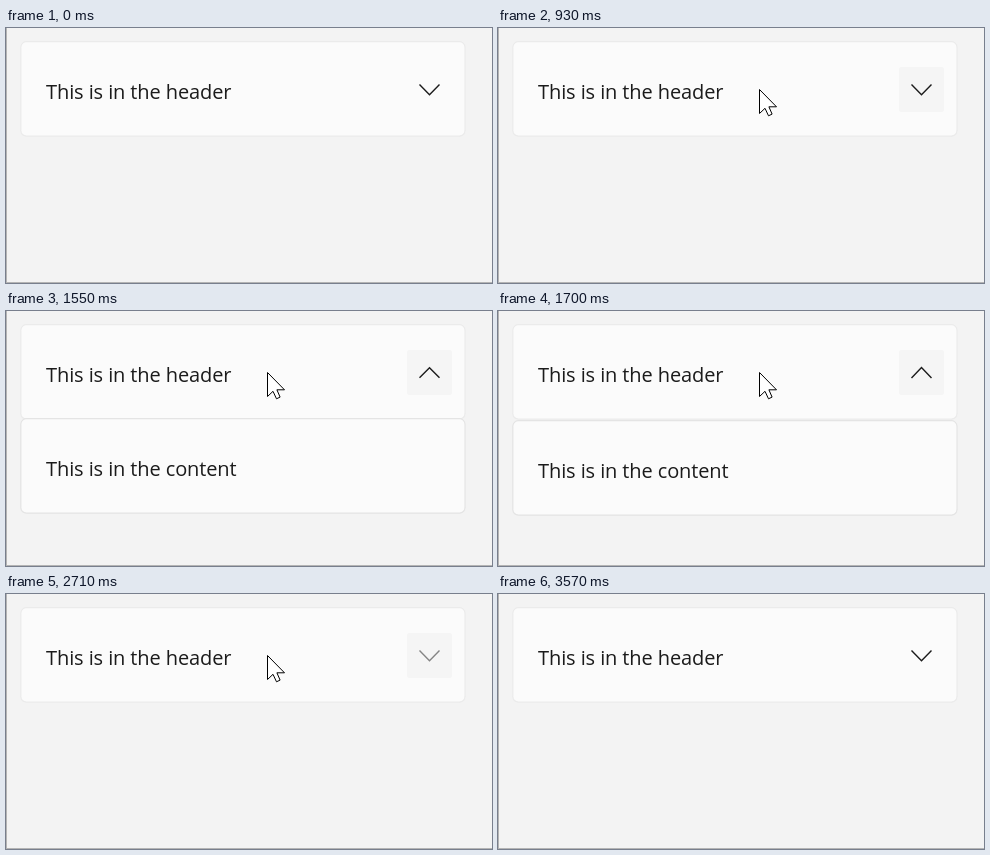
These frames come from a looping animation (486 by 255 pixels, 3960 ms). An HTML page with a canvas:

```html
<!DOCTYPE html>
<html lang="en">
<head>
<meta charset="utf-8">
<title>Expander</title>
<style>
html, body { margin: 0; width: 100%; height: 100%; overflow: hidden; background: #f3f3f3; }
canvas { display: block; }
</style>
</head>
<body>
<canvas id="stage" width="486" height="255"></canvas>
<script>
const ctx = document.getElementById('stage').getContext('2d');
const LOOP = 3960;
const INK = '#1b1b1b';

const ENTER = [550, 930, 6];
const OPEN = [1310, 1700, 6];
const LEAVE = [3260, 3570, 5];
const CLOSE_PRESS = 2620;
const CLOSE = 2710;

// Pointer positions, one per step
const ENTER_PATH = [[276, 221], [272, 163], [268, 117], [264, 84], [262, 66], [261, 61]];
const LEAVE_PATH = [[267, 77], [298, 112], [356, 170], [430, 237]];

function stepAt(t, [start, end, count]) {
  const i = Math.floor((t - start) / (end - start) * (count - 1) + 0.001);
  return Math.max(0, Math.min(count - 1, i));
}

function pointerAt(t) {
  if (t < ENTER[0] || t >= LEAVE[1]) return null;
  if (t >= LEAVE[0]) return LEAVE_PATH[stepAt(t, LEAVE)] || null;
  return ENTER_PATH[stepAt(t, ENTER)];
}

// 0 = closed, 1 = fully open
function openness(t) {
  if (t < OPEN[0] || t >= CLOSE) return 0;
  const i = stepAt(t, OPEN);
  if (i === 0) return 0;
  if (i === OPEN[2] - 1) return 1;
  const stepTime = (OPEN[1] - OPEN[0]) / (OPEN[2] - 1);
  return 1 - Math.exp(-(i * stepTime - 56) / 46);
}

function isPressed(t) {
  return (t >= OPEN[0] && stepAt(t, OPEN) === 0 && t < OPEN[1]) ||
         (t >= CLOSE_PRESS && t < CLOSE);
}

function polyline(points, x = 0, y = 0) {
  ctx.beginPath();
  points.forEach(([px, py]) => ctx.lineTo(x + px, y + py));
}

function roundBox(x, y, w, h, r, fill, stroke) {
  ctx.beginPath();
  ctx.roundRect(x, y, w, h, r);
  ctx.fillStyle = fill;
  ctx.fill();
  if (!stroke) return;
  ctx.strokeStyle = stroke;
  ctx.lineWidth = 1.2;
  ctx.stroke();
}

function card(y, label, border) {
  roundBox(14.8, y - 0.3, 444.2, 94.4, 5.5, '#fbfbfb', border);
  ctx.font = '20px "Open Sans", "Noto Sans", sans-serif';
  ctx.letterSpacing = '-0.1px';
  ctx.fillStyle = INK;
  ctx.fillText(label, 40, y + 57);
}

function chevron(flip, color) {
  const side = 56.5 + 10.5 * flip;
  const tip = 66.8 - 10.3 * flip;
  polyline([[413.5, side], [423.5, tip], [433.5, side]]);
  ctx.strokeStyle = color;
  ctx.lineWidth = 1.4;
  ctx.stroke();
}

function pointer(x, y) {
  polyline([[0, 0], [0, 24], [5.5, 18.8], [9, 26.3], [12.6, 24.6],
            [9.4, 17.3], [17, 17.3]], x + 0.5, y + 0.5);
  ctx.closePath();
  ctx.fillStyle = '#fff';
  ctx.fill();
  ctx.strokeStyle = '#000';
  ctx.lineWidth = 1;
  ctx.stroke();
}

function draw(t) {
  const open = openness(t);
  const pressed = isPressed(t);
  const pos = pointerAt(t);

  ctx.fillStyle = '#f3f3f3';
  ctx.fillRect(0, 0, 486, 255);
  ctx.fillStyle = '#b4b4b4';
  ctx.fillRect(0, 0, 1, 255);
  ctx.fillRect(0, 254, 486, 1);

  card(14, 'This is in the header', '#ebebeb');
  if (open > 0) {
    ctx.save();
    ctx.beginPath();
    ctx.rect(0, 107, 486, 148);
    ctx.clip();
    card(Math.round(110 - 96 * (1 - open)), 'This is in the content', '#e4e4e4');
    ctx.restore();
  }

  if (pos && pos[1] < 108) {
    roundBox(401, 39, 45, 45, 3, pressed ? '#f0f0f0' : '#f5f5f5');
  }
  const fading = t >= CLOSE && t < LEAVE[0] + 90;
  chevron(open, fading ? '#858585' : INK);

  if (pressed) {
    ctx.beginPath();
    ctx.arc(261, 61, 18, 0, Math.PI * 2);
    ctx.fillStyle = '#fcfb83';
    ctx.fill();
  }
  if (pos) pointer(...pos);
}

const began = performance.now();
function tick() {
  draw((performance.now() - began) % LOOP);
  requestAnimationFrame(tick);
}
tick();
</script>
</body>
</html>
```
